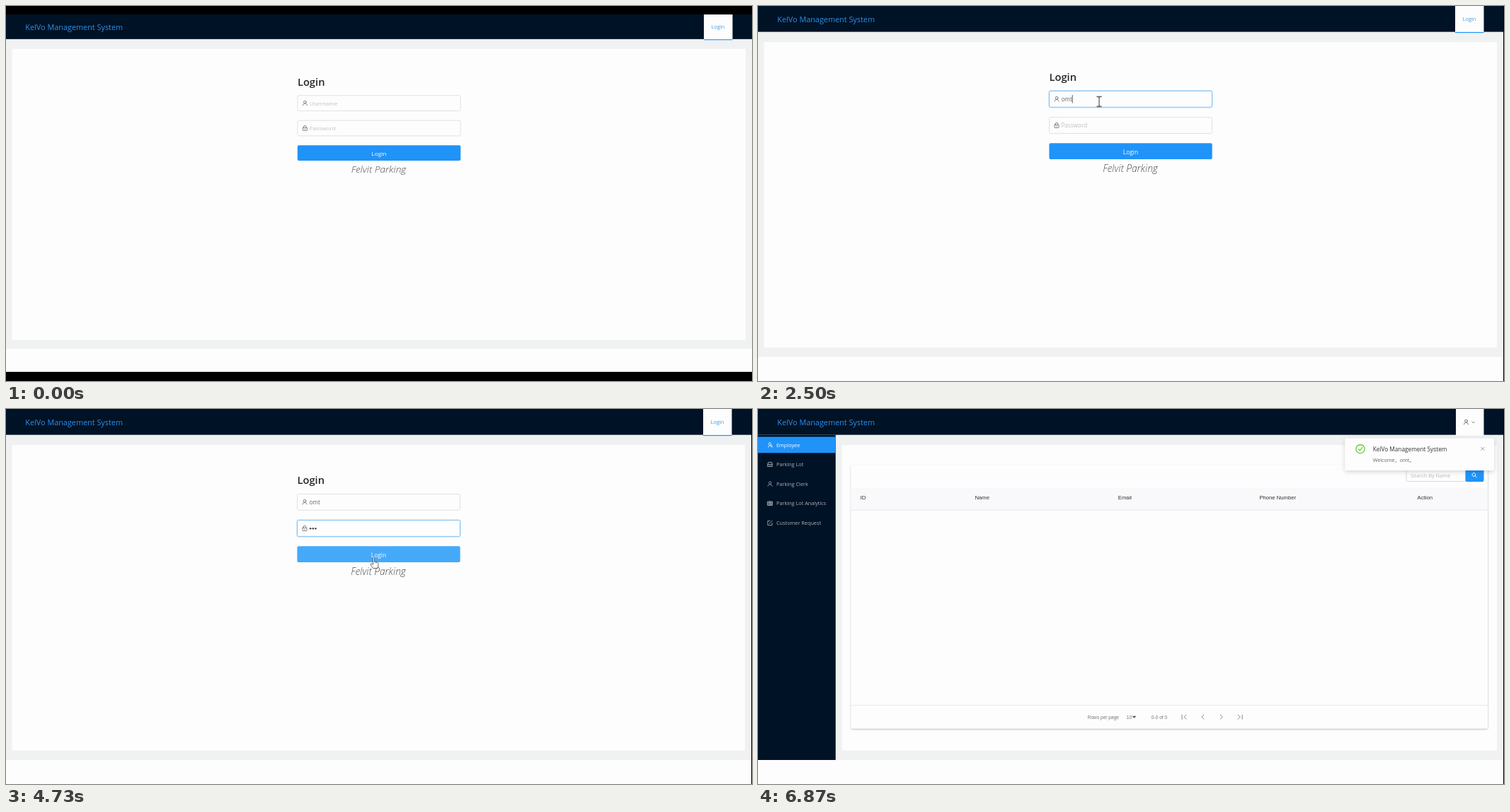
Write an HTML page that moves like this. It is 1054x531 px and loops after 6910 ms.

```html
<!DOCTYPE html>
<html lang="en">
<head>
<meta charset="utf-8">
<style>
  html, body { margin: 0; width: 100%; height: 100%; overflow: hidden; background: #000; }
  svg { display: block; width: 1054px; height: 531px; }
  text { font-family: "Open Sans", "Noto Sans CJK SC", sans-serif; white-space: pre; }
  .arial { font-family: "Liberation Sans", Arial, sans-serif; }
  .line { fill: none; stroke-linecap: round; stroke-linejoin: round; }
</style>
</head>
<body>
<svg viewBox="0 0 1054 531">
  <defs>
    <filter id="soft" x="-20%" y="-40%" width="140%" height="190%">
      <feDropShadow dx="0" dy="2" stdDeviation="3" flood-opacity=".16"/>
    </filter>
    <filter id="lift" x="-2%" y="-2%" width="104%" height="105%">
      <feDropShadow dx="0" dy="1" stdDeviation="1" flood-opacity=".3"/>
    </filter>
    <g id="user" class="line"><circle cy="-1.5" r="1.9"/><path d="M-3 3.3C-2.6-.4 2.6-.4 3 3.3"/></g>
    <g id="lock" class="line"><rect x="-3" y="-.7" width="6" height="4.2" rx=".5"/><path d="M-1.8-.7V-2a1.8 1.8 0 0 1 3.6 0V-.7M0 1v1"/></g>
  </defs>
  <g id="page"></g>
</svg>
<script>
const LOOP = 6910, BRAND = 'KelVo Management System', NAME = 'omt';
const BLUE = '#2093f8', HOVER = '#45a9fa', WHITE = '#fdfdfd', NAVY = '#001226';
const $ = id => document.getElementById(id);

const rect = (x, y, w, h, fill, more = '') =>
  `<rect x="${x}" y="${y}" width="${w}" height="${h}" fill="${fill}" ${more}/>`;
const text = (x, y, size, fill, str, more = '') =>
  `<text x="${x}" y="${y}" font-size="${size}" fill="${fill}" ${more}>${str}</text>`;
const line = (d, color, w = .8, more = '') =>
  `<path class="line" d="${d}" stroke="${color}" stroke-width="${w}" ${more}/>`;
const icon = (id, x, y, color) =>
  `<use href="#${id}" x="${x}" y="${y}" stroke="${color}" stroke-width=".8"/>`;
const MID = 'text-anchor="middle"';

function field(id, y, glyph, hint) {
  return rect(410.9, y - .8, 231.2, 24.4, 'none', `id="${id}Glow" rx="2.4" stroke="${BLUE}" stroke-width="1"`) +
    rect(411.5, y, 230, 22.8, WHITE, `id="${id}Box" rx="2" stroke-width=".9"`) +
    icon(glyph, 422, y + 11.3, '#666') +
    text(428.4, y + 14.7, 8.2, '#c2c2c2', hint, `id="${id}Hint"`);
}

const login = rect(8.5, 51, 1035.5, 432.5, WHITE) +
  rect(985, 0, 40.5, 38, WHITE) + rect(985, 36.9, 40.5, 1.2, BLUE) +
  text(1005, 21.2, 7.4, '#3b9cf2', 'Login', MID) +
  text(411.5, 106, 14.7, '#262626', 'Login', 'font-weight="600"') +
  field('user', 120.4, 'user', 'Username') +
  text(428.4, 135.1, 8.2, '#666', '', 'id="userText"') +
  field('pass', 157.6, 'lock', 'Password') +
  '<g id="dots" fill="#444">' +
  [0, 1, 2].map(i => `<circle cx="${430.2 + i * 3.6}" cy="169.2" r="1.25"/>`).join('') + '</g>' +
  rect(0, 0, .8, 11.5, '#333', 'id="caret"') +
  rect(411.4, 194.3, 230.3, 22.8, BLUE, 'id="button" rx="2"') +
  text(526.5, 210, 8.4, '#fff', 'Login', MID) +
  text(526, 234.8, 13.8, '#4c4c4c', 'Felvit Parking', MID + ' font-style="italic" font-weight="300"') +
  `<g id="arrow">${line('M0 0V12L2.8 9.4 4.7 13.5 6.4 12.7 4.6 8.8H8.4Z', '#222', .8, 'style="fill:#fff"')}</g>` +
  `<g id="beam">${line('M-2.8-7H-1L0-6 1-7H2.8M0-6V6M-2.8 7H-1L0 6 1 7H2.8', '#6a6a6a', 1.8)}${line('M0-5V5', '#ddd', .7)}</g>` +
  `<g id="hand">${line('M-1 1Q0-1 1 1V6L5 7Q7 7.5 6.7 10L5.5 15H-1L-4.5 9.5Q-4.5 7.5-1 9.5Z', '#555', .9, 'style="fill:#fff"')}</g>`;

const menuIcons = [
  'M-2.5 3.3C-2 .2 1 .2 2 3M-.4-3.2a1.8 1.8 0 1 0 .1 0M1.5 0L3.3 3',
  'M-3.2-.5L-2.4-3H2.4L3.2-.5V3H-3.2ZM-3.2-.2H3.2M-1.8 1.4h1M.8 1.4h1',
  'M0-3.3a1.8 1.8 0 1 0 .1 0M-3 3.3C-2.6-.4 2.6-.4 3 3.3',
  'M-3.3-2.7H3.3V2.8H-3.3ZM-3.3-1H3.3M-3.3 1H3.3M-1-2.7V2.8M1-2.7V2.8',
  'M0-3H-3.2V3.2H3V0M-1 1L3.2-3.2'
];
const menu = ['Employee', 'Parking Lot', 'Parking Clerk', 'Parking Lot Analytics', 'Customer Request']
  .map((label, i) => {
    const y = 50.8 + i * 27.65, color = i ? '#a9b1b9' : '#fff';
    return line(menuIcons[i], color, .85, `transform="translate(17 ${y})"`) + text(26, y + 2.7, 7.3, color, label);
  }).join('');
const columns = [[144.5, 'ID'], [306.5, 'Name'], [508.8, 'Email'], [708.4, 'Phone Number'], [931.6, 'Action']]
  .map(([x, label]) => text(x, 127.6, 7.7, '#333', label, 'class="arial"')).join('');
const small = (x, str) => text(x, 438.7, 6.6, '#777', str, 'class="arial"');
const pager = ['M-3-3V3M3-3L0 0 3 3', 'M1.5-3L-1.5 0 1.5 3', 'M-1.5-3L1.5 0-1.5 3', 'M-3-3L0 0-3 3M3-3V3']
  .map((d, i) => line(d, '#888', 1, `transform="translate(${602 + i * 26.4} 436.2)"`)).join('');

const dashboard = rect(0, 36.6, 109.7, 460.4, NAVY) + rect(0, 39.4, 109.7, 22.8, BLUE) + menu +
  rect(986, 0, 39.5, 37.5, WHITE) + icon('user', 1000.5, 18.5, '#555') + line('M1008.7 18L1010.6 20 1012.5 18', '#666') +
  rect(118.5, 51, 925.5, 432.5, WHITE) +
  rect(131.5, 78.4, 899.5, 374, WHITE, 'rx="2" filter="url(#lift)"') +
  rect(131.5, 111, 899.5, 32, '#f9f9fb') + rect(131.5, 142.8, 899.5, .8, '#e4e4e6') + columns +
  rect(131.5, 419.2, 899.5, .8, '#e4e4e6') +
  rect(916, 84.5, 84, 18, WHITE, 'rx="2" stroke="#d9d9de" stroke-width="1"') +
  text(922, 97, 7.4, '#bbb', 'Search By Name') +
  rect(999.5, 84, 26, 19, BLUE, 'rx="2"') +
  line('M1011.3 90.6a2.4 2.4 0 1 0 .1 0M1013.2 94.8L1015.2 96.8', '#fff', 1) +
  small(465.7, 'Rows per page') + small(520.8, '10') +
  '<path d="M528.5 434.8h6l-3 3z" fill="#555"/>' + small(555.8, '0-0 of 0') + pager +
  '<g id="note">' + rect(829.3, 41.5, 210.7, 45.5, WHITE, 'rx="2" filter="url(#soft)"') +
  '<circle cx="851" cy="56.6" r="6.1" fill="none" stroke="#62cb33" stroke-width="1.3"/>' +
  line('M848.3 56.8L850.3 58.8 853.8 54.4', '#62cb33', 1.2) +
  text(868.7, 60, 8.25, '#333', BRAND) +
  text(868.7, 75, 7.2, '#666', `Welcome，${NAME}。`) +
  line('M1021.7 54L1026.1 58.4M1026.1 54L1021.7 58.4', '#888') + '</g>';

$('page').innerHTML = rect(0, 0, 1053, 531, WHITE) + rect(0, 36, 1053, 461, '#f0f1f1') +
  rect(0, 0, 1053, 36.6, NAVY) + text(27.3, 23.3, 10.85, '#2b92ea', BRAND) +
  `<g id="login">${login}</g><g id="dashboard">${dashboard}</g>`;

const clamp = (t, a, b) => Math.min(1, Math.max(0, (t - a) / (b - a)));
const ease = (t, a, b) => { const u = clamp(t, a, b); return u * u * (3 - 2 * u); };
const mix = (a, b, u) => a + (b - a) * u;
const blend = (a, b, u) => `rgb(${a.map((v, i) => mix(v, b[i], u))})`;
const fade = (t, from, to) => ease(t, from, from + 250) - ease(t, to, to + 250);
const show = (id, on) => $(id).style.display = on ? '' : 'none';
const count = (t, ...times) => times.filter(k => t >= k).length;

const FOCUS = 1180, TAB = 2900, CLICK = 5350, SWITCH = 6400;

function border(id, lit, glow) {
  $(id + 'Box').setAttribute('stroke', blend([222, 222, 228], [122, 188, 243], lit));
  $(id + 'Glow').setAttribute('stroke-opacity', .25 * glow);
}

function draw(t) {
  // letterboxed view stretches to fill the stage
  const z = ease(t, 1260, 1430);
  $('page').setAttribute('transform',
    `matrix(${mix(1.001, 1, z)} 0 0 ${mix(.953, 1, z)} 0 ${mix(12, 0, z)})`);
  show('login', t < SWITCH);
  show('dashboard', t >= SWITCH);

  const typed = count(t, 1800, 2050, 2300), stars = count(t, 3550, 3720, 3900);
  $('userText').textContent = NAME.slice(0, typed);
  show('userHint', !typed);
  show('passHint', !stars);
  [...$('dots').children].forEach((dot, i) => dot.style.display = i < stars ? '' : 'none');

  border('user', fade(t, 1080, 4330), fade(t, FOCUS, TAB));
  border('pass', fade(t, TAB, CLICK), fade(t, TAB, CLICK));
  $('button').setAttribute('fill', t < 4470 ? BLUE : HOVER);

  const inPass = t >= TAB, lastKey = inPass ? [TAB, 3550, 3720, 3900][stars] : [FOCUS, 1800, 2050, 2300][typed];
  show('caret', t >= FOCUS && t < CLICK && (t - lastKey) % 1060 < 530);
  const shift = inPass ? stars * 3.6 : typed && $('userText').getComputedTextLength();
  $('caret').setAttribute('x', 428.3 + shift);
  $('caret').setAttribute('y', inPass ? 163.2 : 126);

  const enter = ease(t, 740, 1120), go = ease(t, 4280, 4580);
  const x = mix(mix(560, 482, enter), 519.5, go), y = mix(mix(-16, 135.3, enter), 210.5, go);
  const shape = t < 740 ? '' : y > 194 ? 'hand' : (y > 120 && y < 143) || (y > 157 && y < 181) ? 'beam' : 'arrow';
  for (const id of ['arrow', 'beam', 'hand']) {
    show(id, id === shape);
    $(id).setAttribute('transform', `translate(${x} ${y})`);
  }

  const slide = ease(t, 6450, 6680);
  $('note').setAttribute('transform', `translate(${211 * (1 - slide)} 0)`);
  $('note').setAttribute('opacity', slide);
}

const start = performance.now();
(function frame() {
  draw((performance.now() - start) % LOOP);
  requestAnimationFrame(frame);
})();
</script>
</body>
</html>
```
